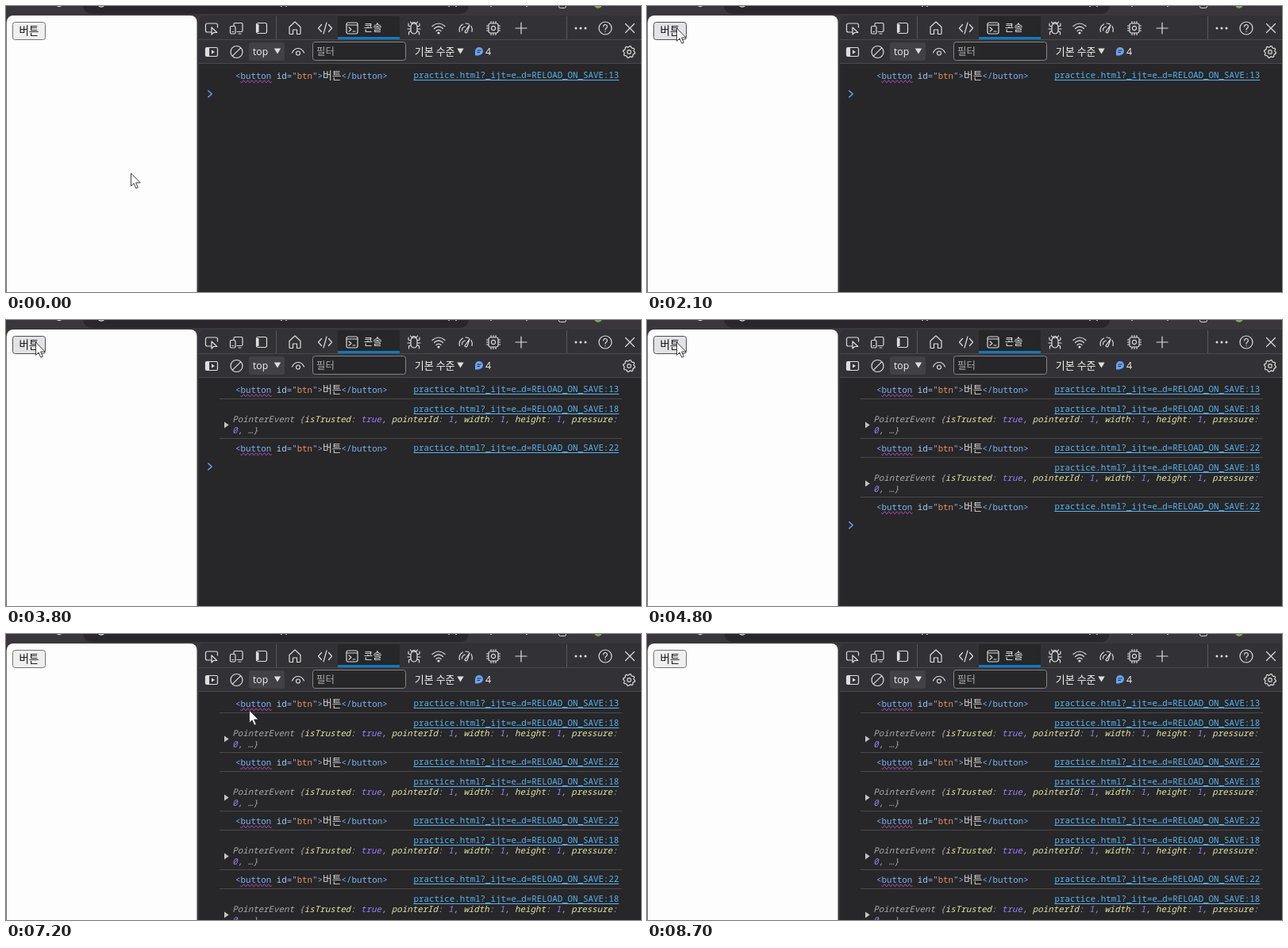
An HTML page with a canvas for the animation above (8.8 s loop, 800 px wide and 361 px high).

```html
<!DOCTYPE html>
<html lang="ko">
<head>
<meta charset="utf-8">
<title>Button click log</title>
<style>
  html, body { margin: 0; width: 100%; height: 100%; overflow: hidden; background: #272628; }
  canvas { display: block; width: 800px; height: 361px; }
</style>
</head>
<body>
<canvas id="stage"></canvas>
<script>
const W = 800, H = 361, LOOP = 8800, STEP = 100;
const canvas = document.getElementById('stage');
const ctx = canvas.getContext('2d');
const ratio = window.devicePixelRatio || 1;
canvas.width = W * ratio;
canvas.height = H * ratio;

const MONO = '10.79px "Noto Sans Mono", monospace';
const hangul = (size, weight = 400) =>
  `${weight} ${size}px "Noto Sans CJK KR", "Noto Sans CJK", sans-serif`;
const latin = size => `${size}px "Open Sans", "Noto Sans", sans-serif`;

const C = {
  chrome: '#3a373c', bar: '#323135', panel: '#272628', line: '#4a494d',
  icon: '#dededf', text: '#f2f2f2', link: '#58b4f0', tag: '#7ab4f4',
  attr: '#a6cdf0', value: '#e5925f', dim: '#aaa9ad', key: '#e3e7a4',
  number: '#997fff', accent: '#0e7ac4', blue: '#68a5f2'
};

// Pointer stops: time, x, y
const stops = [
  [600, 157, 211], [1600, 37, 28], [6600, 37, 28],
  [7200, 306, 96], [7300, 306, 96], [7900, 352, -24]
];
const clicks = [3200, 4200, 5200, 6400];
const PRESS = 200, ROW = 74;

function rect(x, y, w, h, fill) {
  ctx.fillStyle = fill;
  ctx.fillRect(x, y, w, h);
}

function round(x, y, w, h, r, fill, stroke) {
  ctx.beginPath();
  ctx.roundRect(x, y, w, h, r);
  if (fill) { ctx.fillStyle = fill; ctx.fill(); }
  if (stroke) { ctx.strokeStyle = stroke; ctx.lineWidth = 1; ctx.stroke(); }
}

function circle(x, y, r, fill) {
  ctx.beginPath();
  ctx.arc(x, y, r, 0, Math.PI * 2);
  ctx.fillStyle = fill;
  ctx.fill();
}

// Draws text and returns where it ends
function write(str, x, y, font, color) {
  ctx.font = font;
  ctx.fillStyle = color;
  ctx.fillText(str, x, y);
  return x + ctx.measureText(str).width;
}

function writeParts(parts, x, y, font) {
  for (const [str, color, own] of parts) x = write(str, x, y, own || font, color);
}

function shape(d, x, y, { fill, stroke, width = 1.2 } = {}) {
  const path = new Path2D(d);
  ctx.save();
  ctx.translate(x, y);
  ctx.lineJoin = ctx.lineCap = 'round';
  if (fill) { ctx.fillStyle = fill; ctx.fill(path); }
  if (stroke) { ctx.strokeStyle = stroke; ctx.lineWidth = width; ctx.stroke(path); }
  ctx.restore();
}

const ring = (r, x = 0, y = 0) =>
  `M${x - r} ${y}a${r} ${r} 0 1 1 ${2 * r} 0a${r} ${r} 0 1 1 ${-2 * r} 0`;

function gear() {
  const points = [];
  for (let i = 0; i < 32; i++) {
    const a = (i + 0.5) * Math.PI / 16, r = i % 4 < 2 ? 7.5 : 6.1;
    points.push(`${r * Math.cos(a)} ${r * Math.sin(a)}`);
  }
  return `M${points.join('L')}Z${ring(2.3)}`;
}

const icons = [
  [259, 28, 'M-1 5H-5.5a2 2 0 0 1-2-2V-4a2 2 0 0 1 2-2H5.5a2 2 0 0 1 2 2V-1M0-1V8L2.6 5.5H6.8Z'],
  [290, 28, 'M-3-3V-5a1.5 1.5 0 0 1 1.5-1.5H6.5A1.5 1.5 0 0 1 8-5V3A1.5 1.5 0 0 1 6.5 4.5H1M-6-2.5H-2.5A1.5 1.5 0 0 1-1-1V5.5A1.5 1.5 0 0 1-2.5 7H-6A1.5 1.5 0 0 1-7.5 5.5V-1A1.5 1.5 0 0 1-6-2.5M-5 4.5h1.5M3 7H6'],
  [322, 28, 'M-4.5-6.5h9a2 2 0 0 1 2 2v9a2 2 0 0 1-2 2h-9a2 2 0 0 1-2-2v-9a2 2 0 0 1 2-2'],
  [364, 28, 'M-7-1.5L0-8L7-1.5V6.5A1 1 0 0 1 6 7.5H2.5V2H-2.5V7.5H-6A1 1 0 0 1-7 6.5Z'],
  [402, 28, 'M-4.5-4.5L-8.5 0L-4.5 4.5M4.5-4.5L8.5 0L4.5 4.5M2-7L-2 7'],
  [436, 28, 'M-5-7H5a2 2 0 0 1 2 2V5a2 2 0 0 1-2 2H-5a2 2 0 0 1-2-2V-5a2 2 0 0 1 2-2M-7-4H7M-4-1L-1 1.5L-4 4M1 4H4'],
  [514, 28, 'M-4-2a4 4 0 0 1 8 0V3a4 4 0 0 1-8 0ZM-2.5-5a2.5 2.5 0 0 1 5 0M-4-2L-7-3V-6M4-2L7-3V-6M-4 1H-8M4 1H8M-4 3.5L-6.5 5V8M4 3.5L6.5 5V8M-3-6L-4.5-8M3-6L4.5-8'],
  [545, 28, 'M-8-2.5Q0-9.5 8-2.5M-5.5.5Q0-4.5 5.5.5M-3 3.5Q0 .7 3 3.5'],
  [579, 28, 'M-7.5 4.5A8.5 8.5 0 0 1-3.5-5M0-6A8.5 8.5 0 0 1 4-5.2M7-2.5A8.5 8.5 0 0 1 8 4.5M-4.5 3A5 5 0 0 1-.5-2M-1 4.5L5-4L2 5A1.6 1.6 0 0 1-1 4.5'],
  [614, 28, `M-4-6H4a2 2 0 0 1 2 2V4a2 2 0 0 1-2 2H-4a2 2 0 0 1-2-2V-4a2 2 0 0 1 2-2${ring(2.6)}M-3-6V-8.5M0-6V-8.5M3-6V-8.5M-3 6V8.5M0 6V8.5M3 6V8.5M-6-3H-8.5M-6 0H-8.5M-6 3H-8.5M6-3H8.5M6 0H8.5M6 3H8.5`],
  [649, 28, 'M-7 0H7M0-7V7'],
  [755, 28, `${ring(8)}M-2.4-2A2.4 2.4 0 1 1 1.2 0Q0 .7 0 2M0 4.3v.3`],
  [786, 28, 'M-5.5-5.5L5.5 5.5M5.5-5.5L-5.5 5.5'],
  [259, 58, 'M-6-5.5H6a1.5 1.5 0 0 1 1.5 1.5V4A1.5 1.5 0 0 1 6 5.5H-6A1.5 1.5 0 0 1-7.5 4V-4A1.5 1.5 0 0 1-6-5.5M-3.5-5.5V5.5'],
  [290.5, 58, `${ring(7.5)}M-5.2 5.2L5.2-5.2`],
  [368, 58, `M-7.5 1Q-5-4.5 0-4.5T7.5 1${ring(2.5, 0, 1.5)}`],
  [785, 58, gear()]
];

function drawChrome() {
  rect(0, 0, W, H, C.chrome);
  round(97, -14, 486, 24, 11, '#29272b');
  ctx.strokeStyle = C.icon;
  ctx.lineWidth = 1.3;
  for (const [x, r] of [[67, 4.5], [120, 5]]) {
    ctx.beginPath();
    ctx.arc(x, -4, r, 0, Math.PI * 2);
    ctx.stroke();
  }
  for (const x of [346, 352, 557, 566, 610, 655]) rect(x, 0, 2, 1, '#b6b5b8');
  round(696.5, -7.5, 9, 10, 2, null, C.icon);
  circle(746, -2, 5, '#78a955');
}

function drawPage(t) {
  round(1, 12, 239.5, H, [8, 8, 0, 0], '#fefdfe');
  rect(0, 20, 1, H, '#6b696f');
  const over = t >= 1500 && t < 6700;
  const down = clicks.some(c => t >= c - PRESS && t < c);
  const [fill, edge] = down ? ['#f5f5f5', '#8d8d8d']
    : over ? ['#e3e3e5', '#4f4f4f'] : ['#efeff0', '#727272'];
  round(8.5, 20.5, 41, 22, 3, fill, edge);
  write('버튼', 16.6, 36.2, hangul(13.5), '#111');
}

function drawToolbars() {
  round(243, 12, W - 243, H, [8, 0, 0, 0], C.bar);
  rect(418, 13, 78, 29, C.panel);
  rect(243, 42, W - 243, 1, C.line);
  rect(418, 39, 78, 3, C.accent);
  rect(340, 13, 1, 29, '#59585c');
  rect(706, 13, 1, 29, '#59585c');
  rect(243, 73, W - 243, H - 73, C.panel);
  rect(243, 72, W - 243, 1, C.line);

  round(306, 46, 45, 23, 3, '#424146');
  round(386.5, 45.5, 117, 23, 3, C.panel, '#858488');

  for (const [x, y, d] of icons) shape(d, x, y, { stroke: C.icon });
  rect(316, 23, 2.5, 10, C.icon);
  rect(252, 53, 3.5, 10, C.icon);
  circle(545, 34, 1.6, C.icon);
  for (const dx of [-6, 0, 6]) circle(724 + dx, 28, 1.5, C.icon);
  shape('M-1-2.5L3 0L-1 2.5Z', 260, 58, { fill: C.icon });

  write('콘솔', 450.8, 32.3, hangul(12.4, 500), C.text);
  write('top', 311, 62, latin(12.2), C.text);
  write('필터', 391, 62, hangul(12.4), '#aaa9ad');
  write('기본 수준', 514.8, 62, hangul(13, 500), C.text);
  write('4', 604, 62, latin(12.5), C.text);
  for (const x of [342, 572.5]) shape('M-4.2-3.5H4.2L0 3.5Z', x, 57, { fill: C.icon });
  circle(596, 57, 5, C.blue);
  shape('M-5 0V5.5H0Z', 596, 57, { fill: C.blue });
  rect(593.5, 55.5, 5, 1, C.panel);
  rect(593.5, 58, 3.5, 1, C.panel);
}

function drawLink(line, y) {
  const end = write(`practice.html?_ijt=e…d=RELOAD_ON_SAVE:${line}`, 513.5, y, MONO, C.link);
  rect(513.5, y + 2, end - 513.5, 1, C.link);
}

function drawElement(y, line) {
  writeParts([
    ['<button', C.tag], [' id', C.attr], ['="', C.tag], ['btn', C.value], ['">', C.tag],
    ['버튼', '#d4d4d7', hangul(12.8)], ['</button>', C.tag]
  ], 289, y, MONO);
  ctx.beginPath();
  for (let x = 0; x <= 39; x += 0.5) {
    ctx.lineTo(295.5 + x, y + 3.3 + 1.5 * Math.sin(x * Math.PI * 2 / 5.2));
  }
  ctx.strokeStyle = '#b452c8';
  ctx.lineWidth = 1;
  ctx.stroke();
  drawLink(line, y - 1);
}

function drawEvent(y) {
  const font = 'italic ' + MONO;
  const fields = [['isTrusted', 'true'], ['pointerId', '1'], ['width', '1'], ['height', '1']];
  const parts = [['PointerEvent {', C.dim]];
  for (const [key, value] of fields) {
    parts.push([key, C.key], [': ', C.dim], [value, C.number], [', ', C.dim]);
  }
  parts.push(['pressure', C.key], [':', C.dim]);
  drawLink(18, y);
  writeParts(parts, 285.3, y + 13, font);
  writeParts([['0', C.number], [', …}', C.dim]], 285.3, y + 27, font);
  shape('M-2.5-4L3.2 0L-2.5 4Z', 277.5, y + 16.5, { fill: '#c4c3c7' });
}

function drawLog(t) {
  const count = clicks.filter(c => t >= c).length;
  drawElement(92, 13);
  for (let i = 0; i < count; i++) {
    const top = 100 + i * ROW;
    rect(269, top - 1, 507, 1, C.line);
    drawEvent(top + 16);
    rect(269, top + 49, 507, 1, C.line);
    drawElement(top + 66, 22);
  }
  shape('M-2.2-4L2.2 0L-2.2 4', 257, 111 + count * ROW, { stroke: C.blue, width: 1.5 });
}

function pointerAt(t) {
  if (t <= stops[0][0]) return stops[0].slice(1);
  for (let i = 1; i < stops.length; i++) {
    const [t0, x0, y0] = stops[i - 1], [t1, x1, y1] = stops[i];
    if (t > t1) continue;
    const s = (t - t0) / (t1 - t0), e = s * s * (3 - 2 * s);
    return [x0 + (x1 - x0) * e, y0 + (y1 - y0) * e];
  }
  return null;
}

function drawPointer(t) {
  const at = pointerAt(t);
  if (at) {
    shape('M.5.5V16.3L4.1 12.9L6.8 19.2L9.3 18.1L6.6 12H11.8Z', ...at,
      { fill: '#fff', stroke: '#2a2a2a', width: 0.9 });
  }
}

function draw(now) {
  const t = Math.floor((now % LOOP) / STEP) * STEP;
  ctx.setTransform(ratio, 0, 0, ratio, 0, 0);
  drawChrome();
  drawPage(t);
  drawToolbars();
  drawLog(t);
  drawPointer(t);
  requestAnimationFrame(draw);
}

draw(0);
</script>
</body>
</html>
```
